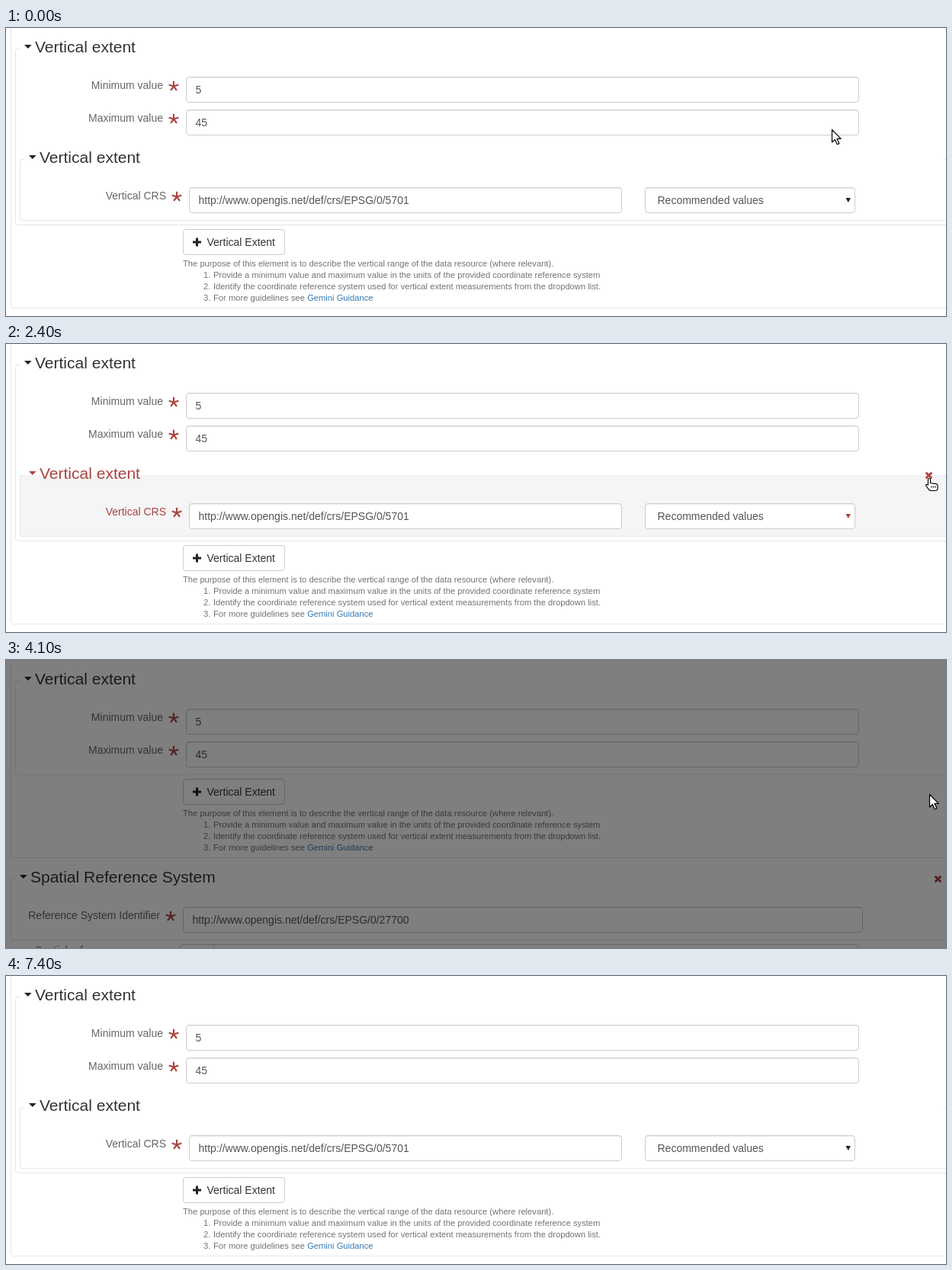
Write an HTML page that moves like this. It is 1233x378 px and loops after 9200 ms.

```html
<!DOCTYPE html>
<html lang="en">
<head>
<meta charset="utf-8">
<title>Removing a vertical extent</title>
<style>
  html, body { margin: 0; width: 100%; height: 100%; overflow: hidden; background: #fff; }
  svg { display: block; font: 14px "Liberation Sans", Arial, sans-serif; }
  .line { fill: none; stroke: #e5e5e5; }
  .box { fill: #fff; stroke: #ccc; }
  .inset { stroke: #000; stroke-opacity: .06; }
  .legend { font-size: 21px; fill: #333; }
  .caret, .plus { fill: #222; }
  .label { fill: #666; text-anchor: end; }
  .value { fill: #555; }
  .button { fill: #333; }
  .help { font-size: 11.2px; fill: #737373; }
  .link { fill: #337ab7; }
  .star { stroke: #a94442; stroke-width: 2.2; }
  .cross { stroke: #a94442; stroke-width: 3; }
  .shade { fill: #f5f5f5; }
  .armed .legend, .armed .label, .armed .caret { fill: #a94442; }
  .cursor { fill: #fff; stroke: #000; stroke-width: 1.2; stroke-linejoin: round; }
</style>
</head>
<body>
<svg id="stage" width="1233" height="378" viewBox="0 0 1233 378"></svg>
<script>
const text = (cls, x, y, content) => `<text class="${cls}" x="${x}" y="${y}">${content}</text>`;
const line = d => `<path class="line" d="${d}"/>`;

const box = (x, y, w, h = 33) =>
  `<rect class="box" x="${x + .5}" y="${y + .5}" width="${w}" height="${h}" rx="3.5"/>`;

const input = (x, y, w, value, pad = 12.5) => box(x, y, w) +
  `<path class="inset" d="M${x + 2} ${y + 1.5}h${w - 3}"/>` + text('value', x + pad, y + 22, value);

const legend = (x, y, title) =>
  `<path class="caret" d="M${x} ${y - 10}h9.6l-4.8 5z"/>` + text('legend', x + 14, y, title);

// Five spokes around the centre
const star = (x, y) => {
  let d = '';
  for (let i = 0; i < 5; i++) {
    const a = i * Math.PI * .4 - Math.PI / 2;
    d += `M${x} ${y}l${(6.7 * Math.cos(a)).toFixed(2)} ${(6.7 * Math.sin(a)).toFixed(2)}`;
  }
  return `<path class="star" d="${d}"/>`;
};

const label = (x, y, name) => text('label', x, y, name) + star(x + 14, y - 3.5);
const cross = (x, y) => `<path class="cross" d="M${x - 3.8} ${y - 3.8}l7.6 7.6m0-7.6l-7.6 7.6"/>`;

const spinner = () => {
  let dots = '';
  for (let i = 0; i < 8; i++) {
    const a = i * Math.PI / 4;
    dots += `<circle cx="${6 * Math.cos(a)}" cy="${6 * Math.sin(a)}" r="${i ? 1.2 : 1.9}"
      fill="#6f9bc8" opacity="${1 - i * .07}"/>`;
  }
  return dots;
};

const guidance = [
  'Provide a minimum value and maximum value in the units of the provided coordinate reference system',
  'Identify the coordinate reference system used for vertical extent measurements from the dropdown list.',
  'For more guidelines see <tspan class="link">Gemini Guidance</tspan>'
];

const stage = document.getElementById('stage');
stage.innerHTML = `
<g id="page">
  ${line('M6.5 0V250')}
  ${line('M18 27.5h-2.5q-3 0-3 3V150')}
  ${legend(24, 32, 'Vertical extent')}
  ${label(206, 80, 'Minimum value')}${input(236, 64, 882, '5')}
  ${label(206, 123, 'Maximum value')}${input(236, 107, 882, '45')}
  <g id="inner">
    <rect id="innerShade" class="shade" x="18" y="172" width="1215" height="80"/>
    <path id="innerEdge" class="line"/>
    ${legend(30, 177, 'Vertical extent')}
    ${label(210, 225, 'Vertical CRS')}
    ${input(240, 209, 567, 'http://www.opengis.net/def/crs/EPSG/0/5701')}
    ${input(838, 209, 275, 'Recommended values', 16.5)}
    <path class="caret" d="M1101.5 223h6.5l-3.25 6z"/>
    <g id="remove">${cross(1210.5, 172.5)}</g>
    <g id="spinner">${spinner()}</g>
  </g>
  <g id="below">
    <rect id="rowShade" class="shade" x="13" y="259" width="1220" height="42"/>
    ${line('M12.5 140V255.5q0 3 3 3H1233')}
    ${line('M6.5 200V364.5q0 3 3 3H1233')}
    ${box(232, 264, 133)}
    <path class="plus" d="M249 275.5h3v4h4v3h-4v4h-3v-4h-4v-3h4z"/>
    ${text('button', 263.5, 286, 'Vertical Extent')}
    ${text('help', 232, 313, 'The purpose of this element is to describe the vertical range of the data resource (where relevant).')}
    ${guidance.map((item, i) =>
      text('help', 259, 328 + 15 * i, `${i + 1}.`) + text('help', 272, 328 + 15 * i, item)).join('')}
    ${line('M12 395.5h-2.5q-3 0-3 3V472.5q0 3 3 3H1233')}
    ${legend(18, 400, 'Spatial Reference System')}${cross(1222.5, 395.5)}
    ${label(202, 448, 'Reference System Identifier')}
    ${input(232, 432, 891, 'http://www.opengis.net/def/crs/EPSG/0/27700')}
    ${text('label', 101, 494, 'Spatial ref')}
    ${box(228, 481, 890)}<path class="box" d="M272.5 481v34"/>
  </g>
</g>
<rect id="overlay" width="1233" height="378" opacity=".5"/>
<path id="arrow" class="cursor" d="M.5 .5V17l3.8-3.6 3 6.4 2.6-1.2-2.9-6.2h5.2z"/>
<path id="hand" class="cursor" d="M-1.5 9V1.8Q-1.5 .5 0 .5T1.6 1.8V6.5l7.5 1.2q2 .4 2 2.3V13q0 3.5-3 3.5H2.4q-1.8 0-3-1.6L-4 10.5q-1-1.8.6-2.2zM3 10.5v2m2.5-2v2m2.5-2v2"/>`;

const el = id => document.getElementById(id);
const show = (id, on) => el(id).setAttribute('visibility', on ? 'visible' : 'hidden');
const move = (id, x, y) => el(id).setAttribute('transform', `translate(${x} ${y})`);
const within = (t, from, to) => t >= from && t < to;
const clamp = v => Math.max(0, Math.min(1, v));

// Cursor tip: time, x, y
const path = [
  [0, 1083, 133], [300, 1103, 152], [400, 1103, 152], [700, 1174, 163], [800, 1174, 163],
  [900, 1201, 172], [1100, 1201, 172], [1300, 1203, 192], [1400, 1210, 205], [1500, 1220, 190],
  [1600, 1221, 168], [1800, 1204, 172], [2000, 1214, 175], [2300, 1214, 175], [2400, 1211, 176],
  [6500, 1211, 176], [6600, 1214, 146], [7000, 1150, 60], [9200, 1150, 60]
];

function cursorAt(t) {
  const i = path.findIndex(p => p[0] > t);
  const [t0, x0, y0] = path[i - 1], [t1, x1, y1] = path[i];
  const k = (t - t0) / (t1 - t0);
  return [Math.round(x0 + (x1 - x0) * k), Math.round(y0 + (y1 - y0) * k)];
}

function draw(t) {
  const removed = within(t, 4100, 5200);
  const squeeze = within(t, 3600, 4100) ? 4 : 0;
  const scroll = within(t, 5200, 5300) ? 92 : within(t, 5300, 5600) ? 39 : 0;
  const armed = within(t, 900, 3500) || within(t, 5600, 6700);
  const loading = within(t, 3500, 4100);

  move('page', 0, -scroll);
  move('below', 0, removed ? -108 : -squeeze);
  el('inner').style.display = removed ? 'none' : '';
  el('inner').setAttribute('class', armed ? 'armed' : '');
  el('innerShade').setAttribute('height', 80 - squeeze);
  el('innerEdge').setAttribute('d',
    `M24 172.5h-2.5q-3 0-3 3V${249.5 - squeeze}q0 3 3 3H1233M1229 172.5h4`);
  show('innerShade', within(t, 900, 4100) || within(t, 5300, 6700));
  show('rowShade', within(t, 5200, 5300));

  el('remove').setAttribute('opacity', loading ? 0 : clamp(t / 300) * clamp((7400 - t) / 300));
  show('spinner', loading && !removed);
  el('spinner').setAttribute('transform',
    `translate(1209 172) rotate(${(t < 3700 ? t - 3700 : 0) * .45 - 10})`);
  show('overlay', within(t, 3900, 5200));

  const [x, y] = cursorAt(t);
  const visible = t < 7200;
  move('arrow', x, y);
  move('hand', x, y);
  show('arrow', visible && !armed);
  show('hand', visible && armed);
}

const start = performance.now();
function tick() {
  const t = (performance.now() - start) % 9200;
  draw(Math.floor(t / 100) * 100);
  requestAnimationFrame(tick);
}
tick();
</script>
</body>
</html>
```
